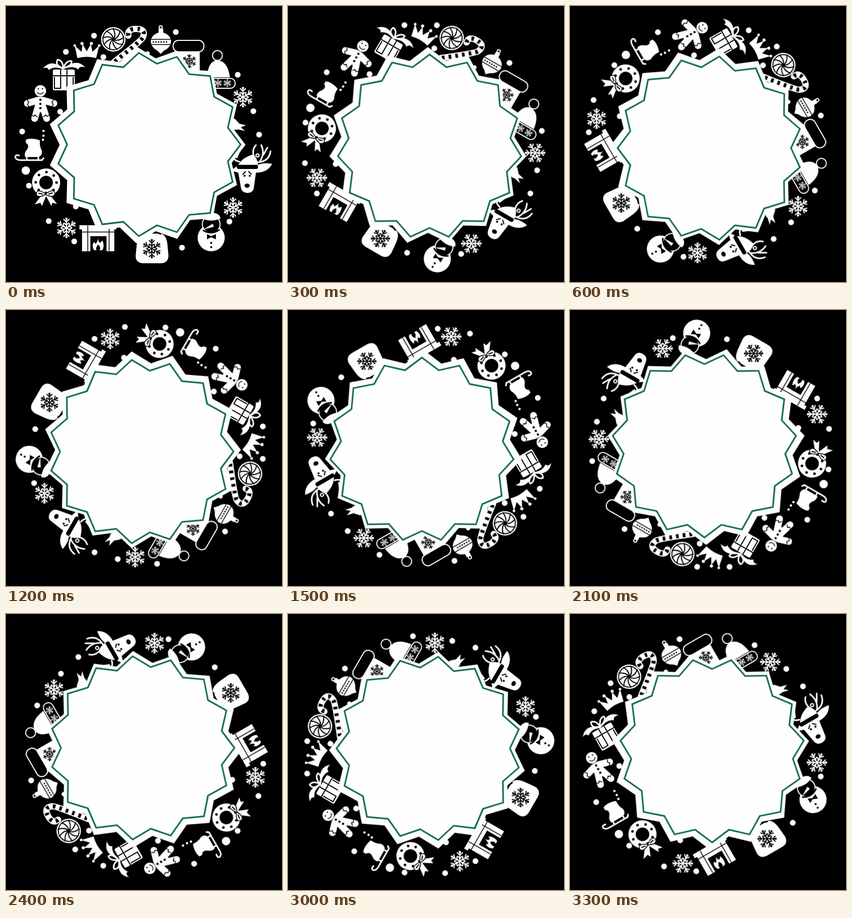
Animation of 530 by 530 pixels, one loop 3.6 s. Source, as an HTML page:

```html
<!DOCTYPE html>
<html lang="en">
<head>
<meta charset="utf-8">
<title>Turning Christmas wreath</title>
<style>
  html, body { margin: 0; width: 100%; height: 100%; overflow: hidden; background: #000; }
  svg { display: block; width: 100%; height: 100%; }
  #wheel { transform-origin: 265px 265px; animation: turn 3.6s steps(12) infinite; }
  @keyframes turn { to { transform: rotate(360deg); } }
  .w { fill: #fefefe; stroke: none; }
  .k { fill: #000; stroke: none; }
  .wl { fill: none; stroke: #fefefe; stroke-width: 3; stroke-linecap: round; stroke-linejoin: round; }
  .kl { fill: none; stroke: #000; stroke-width: 2; stroke-linecap: round; stroke-linejoin: round; }
  .box { fill: #000; stroke: #fefefe; stroke-width: 2; }
  .flake { fill: none; stroke: currentColor; stroke-width: 2; stroke-linecap: round; }
  .white { color: #fefefe; }
  .black { color: #000; }
</style>
</head>
<body>
<svg viewBox="0 0 530 530">
  <defs>
    <g id="arm">
      <path d="M0 0V-17M-5-16L0-11L5-16M-4-9L0-5L4-9"/>
      <circle cy="-17" r="1.2" fill="currentColor"/>
    </g>
    <g id="flake" class="flake"></g>
    <path id="swirl" d="M0 0Q10-2 13-16" class="kl" stroke-width="3"/>
  </defs>
  <rect width="530" height="530"/>
  <g id="wheel">
    <g id="dots" class="w"></g>
    <g id="flakes"></g>

    <g id="crown">
      <path class="w" d="M137 100L132 76L145 88L147 73L155 87L163 73L166 88L179 76L173 100Q155 95 137 100Z"/>
      <g class="w"><circle cx="132" cy="76" r="2.5"/><circle cx="146" cy="72" r="3"/><circle cx="164" cy="72" r="3"/><circle cx="179" cy="76" r="2.5"/></g>
    </g>

    <g id="lollipop" transform="translate(206 64)">
      <circle class="w" r="23.5"/>
      <g id="swirls"></g>
      <circle class="kl" r="20" stroke-width="1"/>
    </g>

    <g id="cane" fill="none">
      <path d="M235 57Q232 45 248 44Q270 43 263 60Q261 66 207 108" stroke="#fefefe" stroke-width="12" stroke-linecap="round"/>
      <path d="M235 57Q232 45 248 44Q270 43 263 60Q261 66 207 108" stroke="#000" stroke-width="8" stroke-dasharray="5 8"/>
    </g>

    <g id="ornament">
      <circle class="wl" cx="297" cy="41" r="3" style="stroke-width:2"/>
      <path class="w" d="M293 44H302V51Q317 56 317 69Q315 81 303 86L297 92L291 86Q280 81 278 69Q278 56 293 51Z"/>
      <path class="kl" d="M279 64H316M280 74H315" style="stroke-width:1.5"/>
      <path class="kl" d="M283 69H313" style="stroke-width:3;stroke-dasharray:0 5"/>
    </g>

    <g id="stocking">
      <path class="w" d="M329 87H372V130H340Z"/>
      <rect class="box" x="321" y="66" width="59" height="22" rx="10"/>
    </g>

    <g id="hat">
      <path class="w" d="M386 137Q388 105 406 104Q426 106 430 137Z"/>
      <circle class="box" cx="406" cy="95" r="9.5"/>
      <rect class="box" x="384" y="139" width="56" height="19" rx="9"/>
    </g>

    <path id="bird" class="w" d="M425 211L440 217L448 226L461 229L451 233L459 240L446 237Q434 240 425 231Z"/>

    <g id="reindeer">
      <path class="wl" d="M481 300Q505 300 508 279M487 299Q498 284 490 267M494 286L502 272M477 291Q471 277 480 267M448 299Q434 296 434 280M443 291L448 279"/>
      <path class="w" d="M444 307H481Q490 300 511 303Q503 320 480 320L476 348Q475 359 463 359Q452 358 451 348L446 320L432 316Z"/>
      <path class="w" d="M446 305Q455 290 475 285Q483 293 484 305Z"/>
      <rect class="k" x="443" y="305" width="41" height="8" rx="4"/>
      <circle class="box" cx="483" cy="287" r="3"/>
      <path class="kl" d="M455 323L460 318M471 323L466 318"/>
      <g class="k"><circle cx="458" cy="326" r="2"/><circle cx="468" cy="326" r="2"/><ellipse cx="463" cy="345" rx="5" ry="4"/></g>
    </g>

    <g id="snowman">
      <circle class="w" cx="394" cy="445" r="26"/>
      <circle class="box" cx="394" cy="419" r="17"/>
      <path class="w" d="M376 408Q378 397 394 397Q410 397 412 408Q394 416 376 408Z"/>
      <path class="w" d="M379 429L397 418L399 424Z"/>
      <path class="kl" d="M379 431Q394 440 409 430" style="stroke-width:3"/>
      <path class="k" d="M386 438L394 442L403 438V448L394 444L386 448Z"/>
      <circle class="k" cx="394" cy="455" r="2"/><circle class="k" cx="394" cy="463" r="2"/>
    </g>

    <g id="bag">
      <path class="w" d="M263 437H298Q308 440 310 458L312 480Q311 494 297 494H263Q249 493 249 480L251 458Q253 440 263 437Z"/>
      <path class="kl" d="M263 438Q280 431 297 438"/>
    </g>

    <g id="fireplace">
      <path class="w" d="M141 421H212V429H208V471H146V429H141Z"/>
      <path class="k" d="M162 442H193V472H162Z"/>
      <path class="kl" d="M144 434H210M157 422V470M198 422V470" style="stroke-width:1.5"/>
      <path class="w" d="M177 443Q176 452 181 455L185 450Q190 461 185 469H169Q164 460 169 453L172 457Q177 452 177 443Z"/>
      <path class="k" d="M177 458Q184 465 179 469H174Q171 465 177 458Z"/>
    </g>

    <g id="wreath">
      <path class="w" d="M70 361L55 381L66 378L69 384L77 365L87 384L89 378L98 380L83 361Z"/>
      <circle cx="77" cy="339" r="20" fill="none" stroke="#fefefe" stroke-width="14"/>
      <circle class="kl" cx="77" cy="339" r="20" style="stroke-width:5;stroke-dasharray:0 15.71"/>
      <path d="M76 361Q60 349 58 361Q60 370 76 362Q92 370 94 360Q92 349 76 361Z" fill="#fefefe" stroke="#000" stroke-width="1.5"/>
      <path class="kl" d="M63 360L70 361M82 361L89 359"/>
    </g>

    <g id="skate">
      <path class="w" d="M38 257Q48 252 65 258Q64 270 69 278Q70 288 62 290H37Q34 283 40 276Q46 267 38 263Z"/>
      <path class="wl" d="M25 287Q17 285 18 291Q20 296 28 296H69L72 292M40 290V296M62 290V296"/>
      <g class="w"><circle cx="72" cy="240" r="2.3"/><circle cx="72" cy="249" r="2.3"/><circle cx="71" cy="257" r="2.3"/></g>
    </g>

    <g id="gingerbread">
      <circle class="w" cx="66" cy="163" r="11"/>
      <path d="M41 187L61 181H71L92 187M64 185L55 216M68 185L78 216" fill="none" stroke="#fefefe" stroke-width="13" stroke-linecap="round" stroke-linejoin="round"/>
      <path class="w" d="M56 176H76V204H56Z"/>
      <path class="kl" d="M60 166Q66 172 72 166" style="stroke-width:1.5"/>
      <path class="kl" d="M41 181L44 185L41 189L44 193M91 181L88 185L91 189L88 193M49 209L53 212L56 209L60 213M72 213L76 209L79 212L83 209" style="stroke-width:1.5"/>
      <g class="k"><circle cx="62" cy="159" r="1.3"/><circle cx="70" cy="159" r="1.3"/><circle cx="66" cy="180" r="2.2"/><circle cx="66" cy="188" r="2.2"/><circle cx="66" cy="196" r="2.2"/></g>
    </g>

    <g id="gift">
      <rect class="w" x="90" y="122" width="42" height="40" rx="3"/>
      <path class="kl" d="M88 134H134M93 137V158H105V136M117 136V158H129V137M105 123V132M117 123V132"/>
      <path class="w" d="M109 119Q86 101 71 120Q80 116 82 123Q94 114 109 122Q128 113 139 122Q141 114 152 118Q137 100 113 118Z"/>
      <path class="wl" d="M110 119Q93 114 99 103Q109 104 110 119Q117 103 126 106Q127 115 110 119"/>
    </g>

    <g id="marks"></g>
    <polygon id="rim" class="w"/>
    <polygon id="star" fill="#fefefe" stroke="#0b6655" stroke-width="3"/>
  </g>
</svg>
<script>
  const $ = id => document.getElementById(id);

  const use = (id, transform, cls = '') =>
    `<use href="#${id}" transform="${transform}" class="${cls}"/>`;
  const ring = (id, n) =>
    Array.from({ length: n }, (_, i) => use(id, `rotate(${i * 360 / n})`)).join('');
  const flake = (x, y, scale, cls) =>
    use('flake', `translate(${x} ${y}) scale(${scale})`, cls);

  function star(cx, cy, outer, inner, tips = 15) {
    return Array.from({ length: tips * 2 }, (_, i) => {
      const a = i * Math.PI / tips, r = i % 2 ? inner : outer;
      return `${(cx + r * Math.cos(a)).toFixed(1)},${(cy + r * Math.sin(a)).toFixed(1)}`;
    }).join(' ');
  }

  $('flake').innerHTML = ring('arm', 6);
  $('swirls').innerHTML = ring('swirl', 9);
  $('flakes').innerHTML = [[455, 175], [436, 387], [116, 426]]
    .map(([x, y]) => flake(x, y, 1.03, 'white')).join('');
  $('marks').innerHTML = flake(352, 106, .7, 'black') + flake(280, 466, .97, 'black')
    + flake(407, 148, .4, 'white') + flake(425, 148, .4, 'white');

  const dots = [[445, 132], [475, 202], [486, 247], [429, 414], [338, 464], [131, 452],
    [82, 413], [38, 316, 8], [44, 345], [31, 241], [104, 203], [115, 88], [169, 57],
    [187, 98], [326, 50], [134, 385], [272, 91, 4]];
  $('dots').innerHTML = dots
    .map(([x, y, r = 5.5]) => `<circle cx="${x}" cy="${y}" r="${r}"/>`).join('');

  $('rim').setAttribute('points', star(270, 266.5, 190, 167));
  $('star').setAttribute('points', star(273.5, 266, 177, 156));
</script>
</body>
</html>
```
